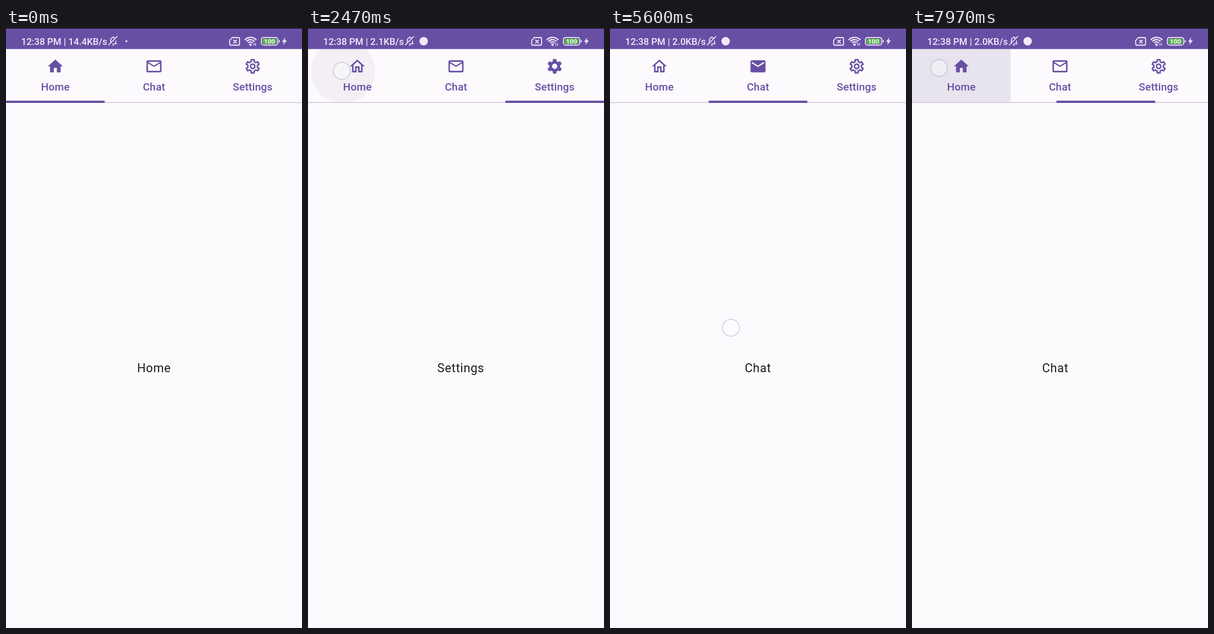
Recreate the animation shown at these times as an HTML page with a canvas. Size 526 by 1065 pixels, loop 8000 ms.

```html
<!DOCTYPE html>
<html lang="en">
<head>
<meta charset="utf-8">
<title>Tabs</title>
<style>
  html, body { margin: 0; width: 100%; height: 100%; overflow: hidden; background: #fdfafd; }
  canvas { display: block; width: 526px; height: 1065px; }
</style>
</head>
<body>
<canvas id="stage"></canvas>
<script>
const W = 526, H = 1065, LOOP = 8000, STEP = 100 / 3;
const TAB = W / 3, TOP = 37.4, BOTTOM = 133, DP = 1.34;
const PRIMARY = '#6750a4', PAPER = '#fdfafd', STATUS = '#f0eafa';
const FONT = 'Roboto, "Open Sans", sans-serif';
const NAMES = ['Home', 'Chat', 'Settings'];

const canvas = document.getElementById('stage');
const dpr = window.devicePixelRatio || 1;
canvas.width = W * dpr;
canvas.height = H * dpr;
const c = canvas.getContext('2d');

// down: finger lands, go: pages start to scroll, lag: delay of the indicator
const tap = (down, go, to, x, y, lag = 17) => ({ down, go, to, x, y, mark: go + lag });
const swipe = (down, to, x, y) => ({ down, go: down, to, x, y, drag: 100, mark: down + 280 });
const moves = [
  tap(30, 60, 1, 238, 78),
  tap(1000, 1050, 0, 64, 76),
  tap(1620, 1657, 2, 416, 78, 35),
  tap(2430, 2460, 0, 60, 76),
  tap(3366, 3420, 1, 236, 78),
  tap(4200, 4243, 2, 420, 78),
  swipe(4866, 1, 205, 530),
  swipe(5600, 0, 215, 532),
  swipe(6400, 1, 400, 530),
  swipe(7230, 2, 400, 530),
  tap(7800, 7884, 0, 48, 71)
];
moves.forEach((m, i) => { m.from = i ? moves[i - 1].to : 0; });

const DRAG = 0.4;
const clamp = v => Math.max(0, Math.min(1, v));

// cubic-bezier(.4, 0, .2, 1)
function ease(x) {
  if (x <= 0) return 0;
  if (x >= 1) return 1;
  let lo = 0, hi = 1, s = 0.5;
  for (let i = 0; i < 24; i++) {
    s = (lo + hi) / 2;
    const px = 1.2 * s * (1 - s) ** 2 + 0.6 * s * s * (1 - s) + s ** 3;
    if (px < x) lo = s; else hi = s;
  }
  return s * s * (3 - 2 * s);
}

// Critically damped spring: what is left of the way
function spring(t, k, left = 1, speed = 0) {
  return (left + (k * left - speed) * t) * Math.exp(-k * t);
}

function pageAt(t) {
  const m = moves.findLast(m => m.go <= t);
  if (!m) return 0;
  const dt = t - m.go;
  let left;
  if (!m.drag) left = spring(dt, 0.02);
  else if (dt < m.drag) left = 1 - DRAG * dt / m.drag;
  else left = spring(dt - m.drag, 0.03, 1 - DRAG, DRAG / m.drag);
  return m.to + (m.from - m.to) * left;
}

function text(s, x, y, size, weight, color, spacing = 0, align = 'center') {
  c.font = `${weight} ${size}px ${FONT}`;
  c.letterSpacing = spacing + 'px';
  c.textAlign = align;
  c.fillStyle = color;
  c.fillText(s, x, y);
}

function disc(x, y, r) {
  c.beginPath();
  c.arc(x, y, r, 0, 7);
}

function line(d, color, width) {
  c.strokeStyle = color;
  c.lineWidth = width;
  c.lineCap = c.lineJoin = 'round';
  c.stroke(new Path2D(d));
}

function at(x, y, scale, draw) {
  c.save();
  c.translate(x, y);
  c.scale(scale, scale);
  draw();
  c.restore();
}

function gear(outer, root) {
  const p = new Path2D();
  for (let i = 0; i < 6; i++) {
    for (const [da, r] of [[-0.31, root], [-0.2, outer], [0.2, outer], [0.31, root]]) {
      const a = i * Math.PI / 3 - Math.PI / 2 + da;
      p.lineTo(r * Math.cos(a), r * Math.sin(a));
    }
  }
  p.closePath();
  return p;
}

const glyphs = [
  ['M12 5.69l5 4.5V18h-2v-6H9v6H7v-7.81zM12 3L2 12h3v8h6v-6h2v6h6v-8h3z',
   'M10 20v-6h4v6h5v-8h3L12 3 2 12h3v8z'],
  ['M22 6q0-2-2-2H4q-2 0-2 2v12q0 2 2 2h16q2 0 2-2zm-2 0l-8 5-8-5zm0 12H4V8l8 5 8-5z',
   'M20 4H4q-2 0-2 2v12q0 2 2 2h16q2 0 2-2V6q0-2-2-2zm0 4l-8 5-8-5V6l8 5 8-5z']
].map(pair => pair.map(d => new Path2D(d)));

function tabIcon(i, on) {
  c.fillStyle = c.strokeStyle = PRIMARY;
  c.lineJoin = 'round';
  if (i < 2) {
    c.translate(-12, -12);
    c.fill(glyphs[i][+on], 'evenodd');
    return;
  }
  if (on) {
    const p = gear(9.6, 7);
    p.moveTo(3.5, 0);
    p.arc(0, 0, 3.5, 0, 7);
    c.fill(p, 'evenodd');
    c.lineWidth = 0.7;
    c.stroke(gear(9.6, 7));
  } else {
    c.lineWidth = 1.9;
    c.stroke(gear(9, 6.5));
    disc(0, 0, 2.9);
    c.stroke();
  }
}

function bell(x) {
  at(x, 23, 1, () => {
    line('M-6 5H6M-4.5 5V-1Q-4-6 0-6Q4-6 4.5-1V5M-1 7.5H1M0-7.5V-6', STATUS, 1.7);
    line('M8-7L-7 8', PRIMARY, 4);
    line('M7-8L-8 7', STATUS, 1.7);
  });
}

function statusBar(t) {
  c.fillStyle = PRIMARY;
  c.fillRect(0, 0, W, TOP);
  c.fillStyle = '#0c0912';
  c.fillRect(0, 0, W, 1);

  const early = t < 1000;
  const rate = early ? '14.4' : t < 4900 ? '2.1' : '2.0';
  text(`12:38 PM | ${rate}KB/s`, 27, 29.5, 16.6, 500, STATUS, 0, 'left');
  bell(early ? 190.5 : 181);
  c.fillStyle = STATUS;
  if (early) disc(214, 23.5, 1.7);
  else disc(205.5, 23.5, 7.5);
  c.fill();

  // SIM card
  line('M402 17H413Q415 17 415 19V28Q415 30.5 413 30.5H399.5Q397.5 30.5 397.5 28.5V22Z', STATUS, 1.8);
  line('M404.5 21.5L409.5 26.5M409.5 21.5L404.5 26.5', STATUS, 1.8);

  // Wi-Fi
  c.lineCap = 'butt';
  c.strokeStyle = STATUS;
  c.lineWidth = 2.2;
  for (const r of [5.5, 9.5, 13.5]) {
    c.beginPath();
    c.arc(434.5, 30, r, -Math.PI / 2 - 0.87, -Math.PI / 2 + 0.87);
    c.stroke();
  }
  c.fillStyle = STATUS;
  disc(434.5, 29.5, 2.2);
  c.fill();
  line('M440.5 27V31M443.5 27V31', STATUS, 1.2);

  // Battery
  c.beginPath();
  c.roundRect(453.8, 16.8, 29, 13.6, 4);
  c.strokeStyle = STATUS;
  c.lineWidth = 1.7;
  c.stroke();
  c.fillStyle = '#58b54b';
  c.beginPath();
  c.roundRect(456, 19, 24.6, 9.2, 2);
  c.fill();
  text('100', 468.3, 27.8, 11.5, 700, '#f4f8f0');
  line('M485.5 22V25', STATUS, 1.8);
  c.fillStyle = STATUS;
  c.fill(new Path2D('M496.5 16.5L490.5 24.5H494L492.5 30.5L499 22H495.2Z'));
}

function ripple(m, t) {
  const age = t - m.down;
  const fade = Math.max(m.down + 225, m.go);
  const alpha = 0.13 * clamp(age / 75) * clamp(1 - (t - fade) / 150);
  if (m.drag || age < 0 || alpha <= 0) return;
  const grow = ease(age / 225);
  const left = m.to * TAB;
  const mix = (a, b) => a + (b - a) * grow;
  c.save();
  c.beginPath();
  c.rect(left, TOP, TAB, BOTTOM - TOP - DP);
  c.clip();
  c.globalAlpha = alpha;
  c.fillStyle = '#5f5284';
  disc(mix(m.x, left + TAB / 2), mix(m.y, (TOP + BOTTOM) / 2), mix(52, 113));
  c.fill();
  c.restore();
}

function tabBar(t) {
  const m = moves.findLast(m => m.mark <= t);
  const selected = m ? m.to : 0;
  const mark = m ? m.from + (m.to - m.from) * ease((t - m.mark) / 250) : 0;

  moves.forEach(m => ripple(m, t));
  NAMES.forEach((name, i) => {
    const x = (i + 0.5) * TAB;
    at(x, 68, DP, () => tabIcon(i, i === selected));
    text(name, x, 110.5, 18.8, 500, PRIMARY, 0.13);
  });
  c.fillStyle = '#cac4d0';
  c.fillRect(0, BOTTOM - DP, W, DP);
  c.fillStyle = PRIMARY;
  c.fillRect(mark * TAB, BOTTOM - 4, TAB, 4);
}

function finger(t) {
  for (const m of moves) {
    const end = m.drag ? m.down + m.drag + 40 : m.go + 100;
    if (t < m.down || t > end) continue;
    const way = m.drag ? clamp((t - m.down) / m.drag) * DRAG * W * Math.sign(m.from - m.to) : 0;
    disc(m.x + way, m.y, 15);
    c.fillStyle = 'rgba(252,252,253,.4)';
    c.fill();
    c.strokeStyle = 'rgba(150,156,190,.36)';
    c.lineWidth = 2;
    c.stroke();
  }
}

function draw(t) {
  c.setTransform(dpr, 0, 0, dpr, 0, 0);
  c.fillStyle = PAPER;
  c.fillRect(0, 0, W, H);
  const page = pageAt(t);
  NAMES.forEach((name, i) => {
    text(name, W / 2 + (i - page) * W, 610.5, 21.4, 400, '#1c1b1f', 0.67);
  });
  statusBar(t);
  tabBar(t);
  finger(t);
}

// The screen is shown at 30 pictures per second
const start = performance.now();
function tick() {
  const t = (performance.now() - start) % LOOP;
  draw(Math.floor((t + 5) / STEP) * STEP);
  requestAnimationFrame(tick);
}
tick();
</script>
</body>
</html>
```
